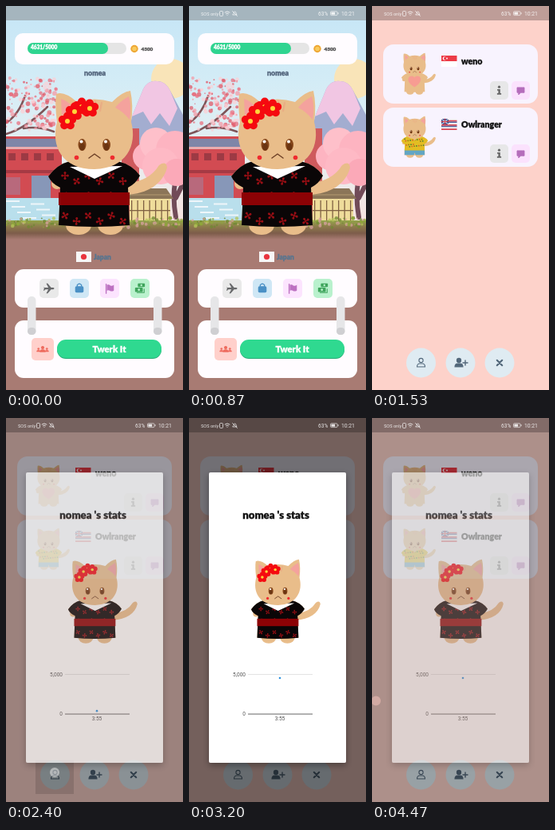
Animation of 222x480 px, one loop 4540 ms. Source, as an HTML page:

```html
<!DOCTYPE html>
<html lang="en">
<head>
<meta charset="utf-8">
<title>Cat app</title>
<style>
html, body { margin: 0; width: 100%; height: 100%; overflow: hidden; background: #a87b73; }
svg { display: block; width: 100vw; height: 100vh; }
.bold { font-family: Lato, sans-serif; font-weight: 900; stroke-width: .35; stroke-linejoin: round; }
.plain { font-family: Roboto, sans-serif; }
</style>
</head>
<body>
<svg id="stage" viewBox="0 0 222 480" preserveAspectRatio="none"></svg>
<script>
let seed = 7;
const random = () => (seed = (seed * 16807) % 2147483647) / 2147483647;
const repeat = (n, draw) => Array.from({ length: n }, (_, i) => draw(i)).join('');
const rect = (x, y, w, h, fill, r = 0, more = '') =>
  `<rect x="${x}" y="${y}" width="${w}" height="${h}" rx="${r}" fill="${fill}" ${more}/>`;
const oval = (x, y, rx, ry, fill, more = '') =>
  `<ellipse cx="${x}" cy="${y}" rx="${rx}" ry="${ry}" fill="${fill}" ${more}/>`;
const dot = (x, y, r, fill, more) => oval(x, y, r, r, fill, more);
const path = (d, fill, more = '') => `<path d="${d}" fill="${fill}" ${more}/>`;
const line = (d, color, width = 1) =>
  path(d, 'none', `stroke="${color}" stroke-width="${width}" stroke-linecap="round" stroke-linejoin="round"`);
const bold = (s, x, y, size, fill, anchor = 'start') =>
  `<text class="bold" x="${x}" y="${y}" font-size="${size}" fill="${fill}" stroke="${fill}" text-anchor="${anchor}">${s}</text>`;
const plain = (s, x, y, size, fill, anchor = 'start') =>
  `<text class="plain" x="${x}" y="${y}" font-size="${size}" fill="${fill}" text-anchor="${anchor}">${s}</text>`;
const group = (inner, transform, more = '') => `<g transform="${transform}" ${more}>${inner}</g>`;
const at = (x, y, inner, scale = 1) => group(inner, `translate(${x} ${y}) scale(${scale})`);

// Cat
const TAN = '#e9bd8a';
const BODY = 'M80 194Q64 198 53 213Q57 222 68 227L66 274Q110 278 155 274L153 227Q163 222 168 212Q158 198 140 194Z';
const SHIRT = 'M80 194Q64 198 53 213Q57 222 68 227L67 254H154L153 227Q163 222 168 212Q158 198 140 194Z';

const flower = (x, y) => at(x, y,
  repeat(5, i => dot(6.5 * Math.sin(i * 1.257), -6.5 * Math.cos(i * 1.257), 5, '#f50a10')) + dot(0, 0, 3, '#ffd43a'));

const blossom = (x, y, turn) => group(
  line('M-3 0H3M0-3V3', '#8f0c12', 1.5) +
  repeat(4, i => dot(3.4 * Math.cos(i * 1.571), 3.4 * Math.sin(i * 1.571), 1.5, '#960f15')),
  `translate(${x} ${y}) rotate(${turn})`);

const kimono =
  path(BODY, '#0a0607') +
  repeat(18, i => blossom(74 + i % 6 * 14.5, 212 + Math.floor(i / 6) * 25 + i % 2 * 7, i * 35)) +
  path('M80 201L111 216L146 200Z', '#fff') +
  rect(66, 233, 89, 16, '#8c0205');

const belly = path('M110 254C82 239 76 216 90 208Q103 202 110 212Q117 202 130 208C144 216 138 239 110 254Z', '#f79c92');

const aloha =
  path('M67 250H154V274H114L111 264L108 274H67Z', '#62a6c4') + path(SHIRT, '#e3bd22') +
  repeat(22, i => dot(68 + i * 37 % 84, 205 + i * 23 % 45, 3, ['#3f7d3a', '#d2572e', '#8a7a1c'][i % 3])) +
  path('M97 194L111 212L125 194Z', TAN);

const cat = (outfit, hair = '') =>
  path('M150 222Q180 219 192 199Q201 193 202 202C197 222 178 235 150 236Z', TAN) +
  oval(91, 274, 16, 12, TAN) + oval(131, 274, 16, 12, TAN) +
  oval(64, 222, 7, 7, TAN) + oval(157, 222, 7, 7, TAN) +
  path(BODY, TAN) + outfit +
  path('M63 110Q73 106 89 120Q111 113 133 120Q146 107 156 106Q160 124 157 145C165 174 151 203 111 204C70 204 56 175 64 145Q61 122 63 110Z', TAN) +
  path('M69 116Q78 119 83 126L70 137Z', '#f4a29d') +
  path('M154 113Q143 119 137 127Q147 132 155 142Q158 126 154 113Z', '#f4a29d') +
  line('M104 121L106 131M112 119V134M120 121L118 131', '#e9ae85', 2.4) +
  [95.5, 126].map(x => oval(x, 173.5, 5, 7.6, '#85461a') + oval(x, 176, 3.2, 4.5, '#6b3512') + dot(x - 1, 169.5, 2, '#fff')).join('') +
  line('M104 190L111 185L118 190', '#6d4026', 1.5) +
  [88.5, 133.5].map(x => dot(x, 189.5, 2.8, '#ef2b2f')).join('') +
  hair;

const hostCat = cat(kimono, flower(77, 144) + flower(95, 126) + flower(86, 132) + flower(105, 128));

// Small icons, centred on the origin
const person = (color, filled) =>
  `<g fill="${filled ? color : 'none'}" stroke="${color}" stroke-width="1.1"><circle cy="-3" r="2.6"/><path d="M-5 5Q-5 1-1.5 1H1.5Q5 1 5 5Z"/></g>`;
const plane = path('M-7-1H-1L-4-7H-2L3-1H6Q9 0 6 1.3H3L-2 7H-4L-1 1.3H-5L-7 3H-8L-7 0L-8-3Z', '#68696b');
const bag = rect(-6, -3, 12, 9, '#4a90c5', 2) + line('M-3-3V-5Q0-8 3-5V-3', '#4a90c5', 1.5);
const banner = line('M-5-6V7', '#bd72c2', 1.6) + path('M-4-5Q-1-6 1-4Q4-3 6-5V3Q3 5 0 3Q-2 2-4 3Z', '#bd72c2');
const money = rect(-3, -7, 10, 5, '#3fa55c', 1) + rect(-7, -1, 11, 6, '#3fa55c', 1) +
  dot(2, -4.5, 1.4, '#b9efcb') + dot(-1.5, 2, 1.6, '#b9efcb') + line('M6 1V6H-4', '#3fa55c', 1.2);
const chat = path('M-5-4H5V3H0L-3 6V3H-5Z', '#b56dbb', 'stroke="#b56dbb" stroke-linejoin="round"');
const info = dot(0, -4.3, 1.6, '#666') + path('M-2.4-1.5H1.3V3.5H2.6V5.3H-2.6V3.5H-1.1V.3H-2.4Z', '#666');
const tile = (x, y, size, fill, icon, scale = .88) =>
  rect(x, y, size, size, fill, 5) + at(x + size / 2, y + size / 2, icon, scale);

// Home
const petals = (n, x, y, w, h, colors, size = 3) => repeat(n, () => dot(x + random() * w, y + random() * h,
  .7 + random() * size, colors[Math.floor(random() * colors.length)], 'opacity=".75"'));
const PINKS = ['#f49aa6', '#ea6f7f', '#fbd0d6', '#e05a68'];
const GREENS = ['#8fa83a', '#b4c45a', '#6f8a32', '#d8a0a0'];

const scenery =
  rect(0, 0, 222, 280, 'url(#sky)') +
  dot(207, 91, 25, '#f9e4b8') +
  path('M150 176L158 138L172 104Q178 92 190 94Q200 94 206 106L222 136V190H150Z', '#a3add0') +
  path('M158 138L172 104Q178 92 190 94Q200 94 206 106L215 128L205 150L193 134L182 148L172 132Z', '#f1c6e3') +
  // Red building over water
  rect(0, 163, 70, 78, '#d24b52') + rect(145, 153, 22, 115, '#cf5a5d') +
  path('M0 166H62L66 178H0Z', '#7f86a8') + rect(0, 176, 68, 3, '#e8adb0') +
  repeat(4, i => rect(3 + i * 16, 184, 9, 9, '#9d3a44')) +
  rect(0, 205, 68, 4, '#a63a44') + rect(32, 212, 24, 31, '#8797b8') + rect(0, 214, 18, 22, '#b8697c') +
  rect(0, 240, 70, 29, '#b9dfec') + repeat(7, i => rect(i * 31 % 55, 243 + i * 3.5, 17, 2, '#eef6fa')) +
  // Trees
  line('M0 160Q25 153 52 126M0 146Q16 136 24 112M22 153Q40 150 60 157', '#7e5458', 2.5) +
  petals(170, 0, 90, 63, 66, PINKS, 2.2) +
  line('M213 264Q207 230 216 205M213 240L222 222', '#714b58', 6) +
  dot(176, 188, 17, '#fdb4c1') + dot(188, 172, 20, '#fec0ca') + dot(212, 180, 24, '#fdb4c1') +
  dot(194, 200, 23, '#feb9c5') + dot(214, 208, 17, '#fba9b8') +
  // House and ground
  rect(155, 239, 51, 30, '#efdc9b') + repeat(7, i => rect(157 + i * 7.5, 243, 1.3, 26, '#806244')) +
  rect(155, 255, 51, 1.3, '#806244') + path('M160 228H201L210 241H150Z', '#8b7558') + line('M155 236H206', '#b49a70') +
  rect(0, 268, 222, 24, 'url(#soil)') + petals(140, 0, 265, 222, 12, GREENS, 1.8);

const WHITE = '#fffcff';
const home =
  rect(0, 0, 222, 480, '#a87b73') + scenery + rect(0, 0, 222, 18, '#a5b5be') +
  rect(11, 34, 200, 39, WHITE, 10) + rect(27, 46, 124, 14, '#e5e5e5', 7) + rect(27, 46, 101, 14, '#2fd490', 7) +
  bold('4631/5000', 31, 54, 6.5, '#fff') +
  dot(161, 53.5, 4.7, '#eea634') + dot(161, 53.5, 2.8, '#f9ca5d') + bold('4300', 169.5, 55.8, 6.4, '#555') +
  bold('nomea', 111.5, 86.5, 8.8, '#50627a', 'middle') +
  hostCat +
  rect(88, 307, 19, 13, '#f7f7f7') + dot(97.5, 313.5, 3.6, '#e9353e') + bold('Japan', 110, 316.5, 8.4, '#58758f') +
  rect(11, 329, 200, 48, WHITE, 11) + rect(11, 393, 200, 72, WHITE, 11) +
  tile(42, 341, 24, '#e9e9e9', plane) + tile(80, 341, 24, '#cfe7f5', bag) +
  tile(118, 341, 24, '#fce4fe', banner) + tile(156, 341, 24, '#b9f1cd', money) +
  [27, 185].map(x => rect(x, 363, 10.5, 48, '#e6e6e8', 5) + rect(x, 402, 10.5, 9, '#cfcfd2', 4.5)).join('') +
  tile(32, 415, 28, '#ffd0cb', at(0, 0, person('#ee6a5c', true), .75) +
    at(-6, 1, person('#ee6a5c', true), .5) + at(6, 1, person('#ee6a5c', true), .5)) +
  rect(64, 419, 131, 22, '#28ab76', 11) + rect(64, 417, 131, 23, '#2fd990', 11) +
  bold('Twerk It', 129.5, 432.5, 11.3, '#fff', 'middle');

// Friends list
const card = (y, name, outfit, flag) =>
  rect(14, y, 194, 74, '#f8f3fe', 13) +
  at(21.5, y - 20, cat(outfit), .289) + at(87, y + 14, flag) +
  bold(name, 112, y + 25, 10.6, '#111') +
  tile(148, y + 46, 23, '#e7e7e8', info, 1) + tile(175, y + 46, 23, '#fbe2fd', chat, .9);

const redWhite = rect(0, 0, 19.5, 14, '#fff') + rect(0, 0, 19.5, 7, '#ec3b46') +
  dot(4, 3.5, 2.3, '#fff') + dot(5, 3.5, 2, '#ec3b46') + dot(7, 3.5, .9, '#fff');
const striped = repeat(8, i => rect(0, i * 1.75, 19.5, 1.75, ['#f4f4f4', '#d84450', '#54649c'][i % 3])) +
  rect(0, 0, 9, 7, '#41528e') + line('M0 0L9 7M9 0L0 7', '#fff', 1) + line('M4.5 0V7M0 3.5H9', '#d84450', 1);

const INK = '#53687b';
const backdrop = rect(0, 0, 222, 480, '#fdd2ca') + rect(0, 0, 222, 18, '#be9d98');
const list =
  card(48, 'weno', belly, redWhite) + card(127, 'Owlranger', aloha, striped) +
  [61.5, 111, 160].map(x => dot(x, 446, 18.5, '#dfebf2')).join('') +
  at(61.5, 446, person(INK)) +
  at(109, 446, person(INK, true) + line('M8-3V3M5 0H11', INK, 1.4)) +
  at(160, 446, line('M-3.2-3.2L3.2 3.2M3.2-3.2L-3.2 3.2', INK, 2.2));

// Stats dialog
const dialog =
  rect(25, 68, 172, 363, '#fff', 2, 'filter="url(#shadow)"') +
  bold("nomea 's stats", 109, 126, 13.2, '#111', 'middle') +
  at(47, 115, hostCat, .583) +
  rect(74, 320, 81, .8, '#ddd') + rect(74, 369.6, 81, .9, '#555') +
  plain('5,000', 71, 322.7, 6.5, '#555', 'end') + plain('0', 71, 372, 6.5, '#555', 'end') +
  plain('3:55', 114, 378, 6.5, '#555', 'middle') +
  '<circle id="point" cx="114" r="1.3" fill="#2f93e0"/>';

const statusBar =
  plain('SOS only', 15, 11.5, 5.6, '#fff') +
  rect(38.5, 6.5, 4, 6, 'none', 1, 'stroke="#fff" stroke-width=".8"') +
  line('M45 8Q48 5.5 51 8M46.4 9.7Q48 8.3 49.6 9.7M48 11.5V11.6', '#fff', .9) +
  line('M55 11H60L59 9Q59 7 57.5 7Q56 7 56 9ZM54.5 6.5L60.5 12.5', '#fff', .8) +
  plain('63%', 162, 11.8, 6.6, '#fff') +
  rect(177.5, 6.8, 8.5, 4.8, 'none', 1, 'stroke="#fff" stroke-width=".7"') +
  rect(178.4, 7.7, 4.8, 3, '#fff') + rect(186.6, 8.2, .9, 2, '#fff') + plain('10:21', 191, 11.8, 6.8, '#fff');

const layer = (id, inner) => `<g id="${id}">${inner}</g>`;
const gradient = (id, ...colors) => `<linearGradient id="${id}" x2="0" y2="1">` +
  colors.map((c, i) => `<stop offset="${i / (colors.length - 1)}" stop-color="${c}"/>`).join('') + '</linearGradient>';
stage.innerHTML =
  `<defs>${gradient('sky', '#c5e5f6', '#d3ecf6', '#e6eff2', '#f8e1dc')}${gradient('soil', '#93a54a', '#8d7a4c', '#7d5c4a', '#a87b73')}
    <filter id="shadow" x="-10%" y="-10%" width="120%" height="120%"><feDropShadow dx="0" dy="3" stdDeviation="4" flood-opacity=".35"/></filter>
  </defs>` +
  home + layer('friends', backdrop + layer('cards', list)) +
  layer('press', rect(37, 428, 48, 42, '#000', 0, 'opacity=".13"')) +
  layer('dim', rect(0, 0, 222, 480, '#000')) + layer('stats', dialog) + layer('bar', statusBar) +
  layer('tapOpen', dot(61, 443, 6, '#fff', 'opacity=".45"')) +
  layer('tapClose', dot(5, 353.5, 6, '#ffc9c0', 'opacity=".45"'));

const part = id => document.getElementById(id);
const show = (id, opacity) => { part(id).style.opacity = opacity; };
const progress = (t, start, length) => Math.min(1, Math.max(0, (t - start) / length));
const between = (t, start, end) => t >= start && t < end ? 1 : 0;

function draw(now) {
  const t = now % 4540;
  const enter = progress(t, 940, 200);
  const open = progress(t, 2230, 240) - progress(t, 4360, 270);
  const rise = progress(t, 2270, 730);
  show('friends', enter);
  part('cards').setAttribute('transform', `translate(0 ${34 * (1 - enter) ** 2})`);
  show('dim', .54 * open);
  show('stats', open);
  show('bar', t < 70 ? 0 : .85);
  show('press', between(t, 2170, 2550));
  show('tapOpen', between(t, 2170, 2450));
  show('tapClose', between(t, 4330, 4540));
  part('point').setAttribute('cy', 370 - 45 * rise * rise * (3 - 2 * rise));
  requestAnimationFrame(() => draw(performance.now()));
}
draw(0);
</script>
</body>
</html>
```
